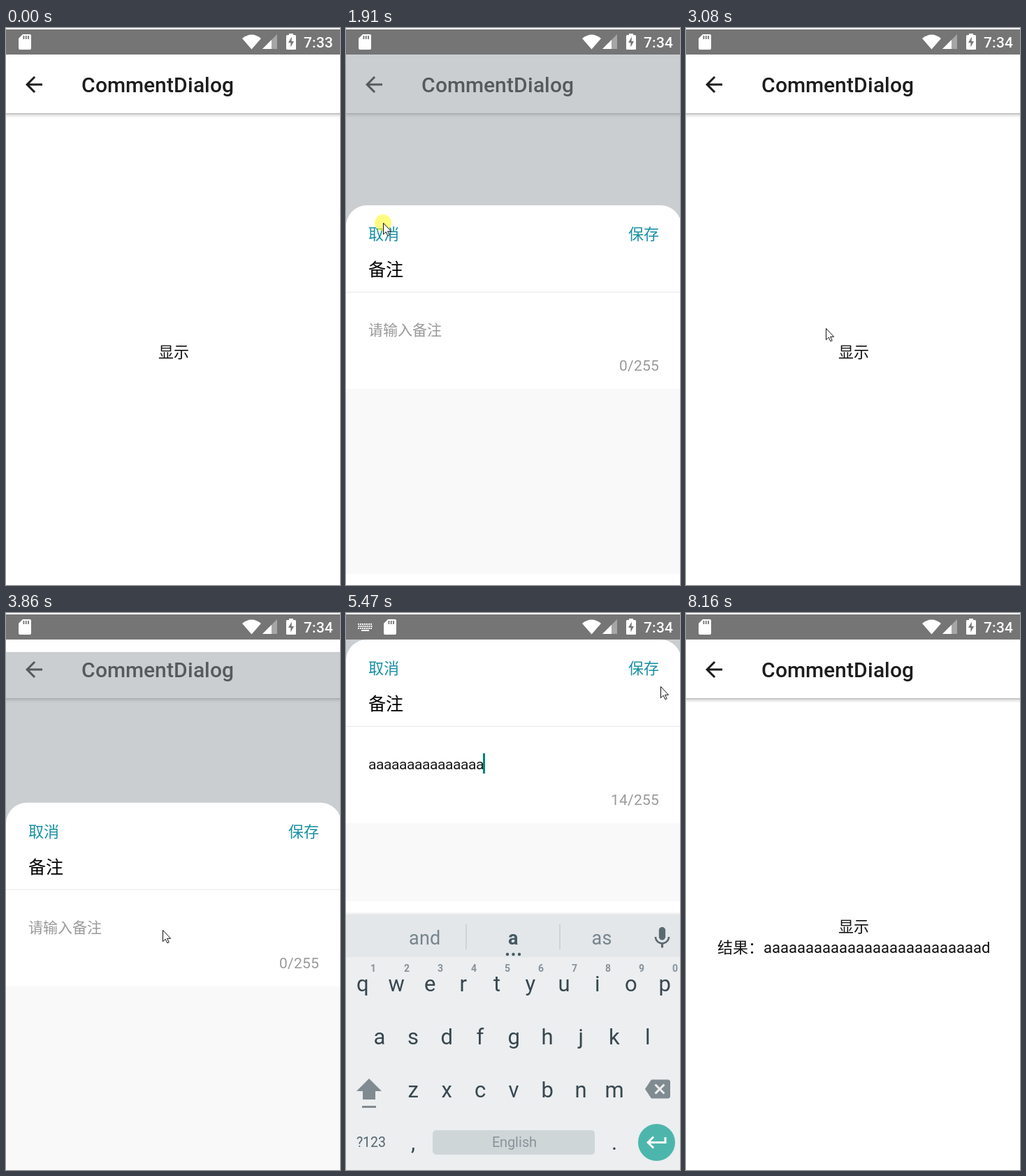
An HTML page with a canvas that plays this animation: 478 by 798 pixels, repeating every 8560 ms.

```html
<!DOCTYPE html>
<html lang="zh-CN">
<head>
<meta charset="utf-8">
<title>Comment sheet</title>
<style>
  html, body { margin: 0; width: 100%; height: 100%; overflow: hidden; background: #fff; }
  canvas { display: block; width: 478px; height: 798px; }
</style>
</head>
<body>
<canvas id="stage" width="478" height="798"></canvas>
<script>
const ctx = document.getElementById('stage').getContext('2d');
const W = 478, H = 798, LOOP = 8560;
const BAR = 38, MODAL_H = 744, TEAL = '#1790a4';
const FONTS = 'Roboto, "Noto Sans CJK SC", "Noto Sans CJK", sans-serif';

const RUNS = [
  [70, 610, 8], [760, 840, 2], [990, 1840, 12], [1910, 1910, 1], [2080, 2460, 6],
  [2610, 3320, 10], [3470, 3630, 3], [3780, 4320, 8], [4470, 5310, 12],
  [5390, 6010, 9], [6160, 6240, 2], [6390, 7240, 12], [7310, 8160, 12]
];

// Pointer path: [time, x, y]
const PATH = [
  [70, 300, 773], [610, 250, 465], [1290, 250, 465], [1840, 53, 279], [2080, 53, 279],
  [2460, 53, 295], [2690, 53, 295], [3083, 200, 430], [3320, 219, 444], [3470, 224, 454],
  [3940, 224, 454], [4320, 170, 436], [4780, 170, 436], [5310, 450, 105], [5480, 450, 105],
  [6010, 418, 81], [6780, 418, 81], [7240, 428, 463], [8083, 328, 775]
];

const ICONS = {
  back: 'M20 11H7.83l5.59-5.59L12 4l-8 8 8 8 1.41-1.41L7.83 13H20z',
  enter: 'M19 7v4H5.83l3.58-3.59L8 6l-6 6 6 6 1.41-1.41L5.83 13H21V7z',
  erase: 'M22 3H7c-.69 0-1.23.35-1.59.88L0 12l5.41 8.11c.36.53.9.89 1.59.89h15c1.1 0 2-.9 2-2V5c0-1.1-.9-2-2-2zm-3 12.59L17.59 17 14 13.41 10.41 17 9 15.59 12.59 12 9 8.41 10.41 7 14 10.59 17.59 7 19 8.41 15.41 12z',
  mic: 'M12 14c1.66 0 3-1.34 3-3V5c0-1.66-1.34-3-3-3S9 3.34 9 5v6c0 1.66 1.34 3 3 3zm5.3-3c0 3-2.54 5.1-5.3 5.1S6.7 14 6.7 11H5c0 3.41 2.72 6.23 6 6.72V21h2v-3.28c3.28-.48 6-3.3 6-6.72z',
  shift: 'M18 0L0 18h9v12h18V18h9zM8 39h20v3H8z',
  card: 'M6 0h10q2 0 2 2v18q0 2-2 2H2q-2 0-2-2V6z',
  wifi: 'M0 5.5Q13.5-5.5 27 5.5L13.5 21z',
  bolt: 'M8 4.5L3 13h3.4v6.5L11 11H7.6z',
  pointer: 'M.5.5v16.2l3.7-3.5 2.7 5.6 2.3-1.1-2.6-5.4h5z'
};
for (const k in ICONS) ICONS[k] = new Path2D(ICONS[k]);

const clamp = v => Math.max(0, Math.min(1, v));
const progress = (t, start, dur) => clamp((t - start) / dur);
const within = (t, a, b) => t >= a && t < b;

function snap(t) {
  let s = 0;
  for (const [a, b, n] of RUNS) {
    if (t < a) break;
    const step = n > 1 ? (b - a) / (n - 1) : 1;
    s = a + step * Math.min(n - 1, Math.floor((t - a) / step + 0.2));
  }
  return s;
}

function rect(x, y, w, h, color) {
  ctx.fillStyle = color;
  ctx.fillRect(x, y, w, h);
}

function round(x, y, w, h, r, color) {
  ctx.fillStyle = color;
  ctx.beginPath();
  ctx.roundRect(x, y, w, h, r);
  ctx.fill();
}

function disc(x, y, r, color) {
  ctx.fillStyle = color;
  ctx.beginPath();
  ctx.arc(x, y, r, 0, 7);
  ctx.fill();
}

function icon(name, x, y, scale, color) {
  ctx.save();
  ctx.translate(x, y);
  ctx.scale(scale, scale);
  ctx.fillStyle = color;
  ctx.fill(ICONS[name]);
  ctx.restore();
}

// Whole-pixel advances, as the device's hinted text has; align: 0 left, .5 centre, 1 right
function text(str, x, y, size, color, align = 0, weight = 400) {
  ctx.font = `${weight} ${size}px ${FONTS}`;
  ctx.fillStyle = color;
  const steps = [...str].map(c => Math.round(ctx.measureText(c).width));
  x -= align * steps.reduce((a, b) => a + b, 0);
  [...str].forEach((c, i) => {
    ctx.fillText(c, x, y);
    x += steps[i];
  });
  return x;
}

function faded(alpha, draw) {
  ctx.save();
  ctx.globalAlpha = alpha;
  draw();
  ctx.restore();
}

function typed(t) {
  const n = t < 4860 ? 0 : Math.min(26, Math.floor((t - 4860) / 40));
  return 'a'.repeat(n) + (t >= 5965 ? 'd' : '');
}

function statusBar(t) {
  rect(0, 0, W, BAR, '#fff');
  rect(0, 2, W, BAR - 2, '#757575');
  const keys = within(t, 4470, 6540);
  if (keys) {
    for (let r = 0; r < 3; r++)
      for (let i = 0; i < 7; i++) rect(17 + i * 3 + (r === 1 ? 0.5 : 0), 15 + r * 3, 2, 2, '#fff');
    rect(22, 24, 11, 2, '#fff');
  }
  const x = keys ? 54 : 18;
  icon('card', x, 9, 1, '#fff');
  for (let i = 0; i < 3; i++) rect(x + 6.5 + i * 3.3, 11, 1.8, 5, '#757575');
  icon('wifi', 338, 9.5, 1, '#fff');
  ctx.save();
  ctx.beginPath();
  ctx.moveTo(388, 9);
  ctx.lineTo(388, 30);
  ctx.lineTo(367, 30);
  ctx.clip();
  rect(367, 9, 21, 21, '#a6a6a6');
  rect(367, 9, 13, 21, '#fff');
  ctx.restore();
  rect(405, 8, 6, 4, '#fff');
  round(401, 10, 14, 21, 1.5, '#fff');
  icon('bolt', 401, 8, 1, '#757575');
  text(t < 310 ? '7:33' : '7:34', 468, 28, 21, '#fff', 1, 500);
}

function page(t) {
  rect(0, 0, W, H, '#fff');
  const shade = ctx.createLinearGradient(0, 122, 0, 129);
  shade.addColorStop(0, 'rgba(0,0,0,.29)');
  shade.addColorStop(0.4, 'rgba(0,0,0,.1)');
  shade.addColorStop(1, 'rgba(0,0,0,0)');
  rect(0, 122, W, 7, shade);
  icon('back', 22, 63, 1.5, '#1c1c1c');
  text('CommentDialog', 108, 92, 30, '#1c1c1c', 0, 500);
  const done = t >= 6390;
  const pressed = within(t, 760, 980) || within(t, 3540, 3770);
  faded(pressed ? 0.3 : 1, () => text('显示', 240, done ? 457 : 472, 22, '#111', 0.5));
  if (done) text('结果:'.replace(':', '：') + typed(t), 240, 487, 22, '#111', 0.5);
}

// Distance of the sheet below its resting place, null while closed
function sheetShift(t) {
  for (const [open, close] of [[900, 2730], [3688, 6509]]) {
    if (!within(t, open, close + 200)) continue;
    const rise = 1 - progress(t, open, 200);
    const fall = progress(t, close, 200);
    return MODAL_H * (rise * rise + fall * fall);
  }
  return null;
}

function sheet(t) {
  const shift = sheetShift(t);
  if (shift === null) return;
  const compact = t >= 4540;
  const top = BAR + shift, height = compact ? 375 : MODAL_H;
  const y = top + (compact ? 0 : 216);
  const value = typed(t);

  ctx.save();
  ctx.beginPath();
  ctx.rect(0, top, W, height);
  ctx.clip();
  rect(0, top, W, height, 'rgba(147,155,161,.49)');
  round(0, y, 480, 600, 30, '#fff');
  rect(0, y + 263, W, 600, '#f9f9f9');
  faded(within(t, 2610, 2680) ? 0.3 : 1, () => text('取消', 32, y + 49, 22, TEAL));
  faded(within(t, 6390, 6460) ? 0.3 : 1, () => text('保存', 448, y + 49, 22, TEAL, 1));
  text('备注', 32, y + 101, 25, '#000');
  rect(0, y + 124, W, 1, '#e9e9e9');
  const end = value
    ? text(value, 32, y + 186, 21, '#1c1c1c')
    : (text('请输入备注', 32, y + 186, 21, '#999'), 32);
  if (compact && t < 6390) rect(end - 1, y + 163, 3, 29, '#008577');
  text(typed(t - 40).length + '/255', 448, y + 237, 21, '#999', 1);
  ctx.restore();
}

function suggestions(t) {
  const long = t >= 5850;
  if (!long) {
    rect(171, 446, 2, 36, '#cdd3d6');
    rect(305, 446, 2, 36, '#cdd3d6');
  }
  if (long) {
    ctx.font = `400 27px ${FONTS}`;
    ctx.fillStyle = '#455a64';
    ctx.textAlign = 'center';
    ctx.fillText(typed(t), 240, 475, 324);
    ctx.textAlign = 'left';
  } else if (typed(t)) {
    text('and', 112.5, 475, 27, '#78858c', 0.5);
    text('a', 239, 475, 27, '#455a64', 0.5, 700);
    text('as', 366, 475, 27, '#78858c', 0.5);
  }
  if (typed(t)) for (let i = -1; i < 2; i++) disc(239.5 + i * 8.5, 489, 2.2, '#455a64');
  icon('mic', 433.9, 447, 1.55, '#5b6a71');
}

function keyboard(t) {
  if (!within(t, 4470, 6740)) return;
  const hidden = 1 - progress(t, 4440, 240) + progress(t, 6500, 240);
  ctx.save();
  ctx.globalAlpha = 1 - clamp(hidden);
  ctx.translate(0, 60 * hidden);
  const shade = ctx.createLinearGradient(0, 428, 0, 433);
  shade.addColorStop(0, 'rgba(0,0,0,0)');
  shade.addColorStop(1, 'rgba(0,0,0,.1)');
  rect(0, 428, W, 5, shade);
  rect(0, 433, W, 60, '#e3e7ea');
  rect(0, 493, W, 365, '#eceef0');
  suggestions(t);

  const ink = '#37474f';
  [['qwertyuiop', 24, 542], ['asdfghjkl', 48, 618], ['zxcvbnm', 96, 694]].forEach(([row, x, y]) =>
    [...row].forEach((c, i) => text(c, x + 48 * i, y, 31, ink, 0.5)));
  for (let i = 0; i < 10; i++)
    text(String((i + 1) % 10), 39 + 48 * i, 514, 14, '#87929a', 0.5, 700);
  icon('shift', 15, 667, 1, '#808b91');
  icon('erase', 428, 664, 1.5, '#808b91');
  text('?123', 36, 765, 19.5, '#546670', 0.5);
  text(',', 96, 769, 31, ink, 0.5);
  round(124, 741, 232, 35, 5, '#cfd6d8');
  text('English', 241, 765, 20, '#87949a', 0.5);
  text('.', 384, 769, 31, ink, 0.5);
  disc(444.5, 758.5, 26.5, '#4db6ac');
  icon('enter', 427, 740.5, 1.5, '#fff');
  ctx.restore();
}

function pointer(t) {
  if (t < 70 || t >= 8150) return;
  let i = 0;
  while (i < PATH.length - 2 && t >= PATH[i + 1][0]) i++;
  const [t0, x0, y0] = PATH[i], [t1, x1, y1] = PATH[i + 1];
  const p = progress(t, t0, t1 - t0);
  const x = Math.round(x0 + (x1 - x0) * p), y = Math.round(y0 + (y1 - y0) * p);
  if (within(t, 1905, 2075)) disc(x, y, 12, 'rgba(255,250,50,.62)');
  ctx.save();
  ctx.translate(x, y);
  ctx.fillStyle = '#fff';
  ctx.strokeStyle = '#111';
  ctx.lineWidth = 1;
  ctx.fill(ICONS.pointer);
  ctx.stroke(ICONS.pointer);
  ctx.restore();
}

function frame() {
  const t = snap(performance.now() % LOOP);
  page(t);
  sheet(t);
  statusBar(t);
  keyboard(t);
  pointer(t);
  requestAnimationFrame(frame);
}
frame();
</script>
</body>
</html>
```
